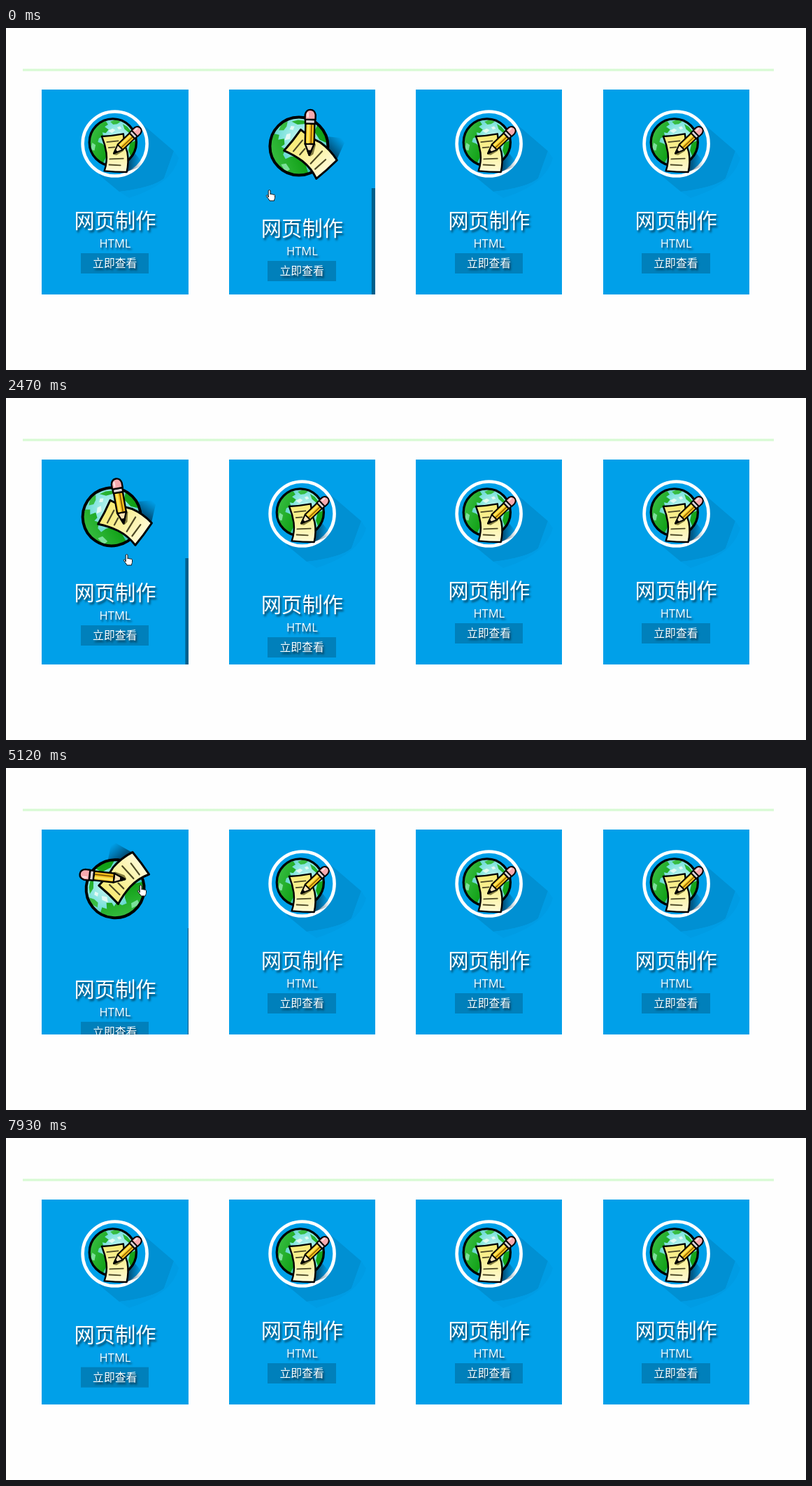
An HTML page for the animation above (8.03 s loop, 1144 by 489 pixels).

```html
<!DOCTYPE html>
<html lang="zh-CN">
<head>
<meta charset="utf-8">
<title>网页制作</title>
<style>
html, body { margin: 0; width: 100%; height: 100%; overflow: hidden; background: #fefefe; }
body { position: relative; font-family: "Open Sans", "Noto Sans CJK SC", "Noto Sans CJK", sans-serif; color: #fff; }
.rule { position: absolute; left: 24px; top: 58px; width: 1074px; height: 4px;
  background: linear-gradient(#ecfdea, #d6fad2 40%, #d6fad2 60%, #ecfdea); }
.card { position: absolute; top: 88px; width: 209.2px; height: 292.6px; overflow: hidden; background: #00a0e9; }
.card svg { position: absolute; left: 0; top: 0; width: 209px; height: 292px; }
.card div { position: absolute; white-space: nowrap; }
.card .label { left: 0; top: 0; width: 100%; height: 100%; text-align: center; text-shadow: 2px 3px 3px rgba(0,0,0,.6); }
.label .title { left: 0; right: 0; top: 167px; font-size: 29.3px; line-height: 40px; }
.label .sub { left: 0; right: 0; top: 207.5px; font-size: 16.5px; line-height: 24px; }
.label .more { left: 55.6px; top: 234px; width: 97.4px; height: 29px; font-size: 15.8px; line-height: 29px; background: rgba(0,0,0,.2); }
.card .panel { left: 0; top: 141px; width: 100%; height: 152px; background: #00608c; text-shadow: 2px 2px 3px rgba(0,0,0,.7); }
.panel .bar { left: 19.6px; top: 20px; width: 4.6px; height: 51px; background: #eff6fa; }
.panel .title { left: 34px; top: 21.5px; font-size: 23.5px; line-height: 32px; font-weight: bold; }
.panel .sub { left: 34px; top: 50.5px; font-size: 16.5px; line-height: 22px; }
.panel .info { left: 19.6px; top: 72px; font-size: 15.7px; line-height: 20.4px; }
.en { font-size: 1.06em; line-height: 1; }
#hand { position: absolute; left: 0; top: 0; width: 16px; height: 18px; overflow: visible; }
</style>
</head>
<body>
<svg width="0" height="0" style="position:absolute">
  <defs>
    <radialGradient id="sea" cx=".62" cy=".4" r=".65">
      <stop offset="0" stop-color="#c4f5f2"/><stop offset=".5" stop-color="#7fe3dd"/><stop offset="1" stop-color="#35bfae"/>
    </radialGradient>
    <linearGradient id="land" x2="1" y2="1">
      <stop offset="0" stop-color="#3fc24a"/><stop offset="1" stop-color="#089a0c"/>
    </linearGradient>
    <linearGradient id="sheet" x2="0" y2="1">
      <stop offset="0" stop-color="#f7ea72"/><stop offset=".6" stop-color="#fbf3a8"/><stop offset="1" stop-color="#fffbd8"/>
    </linearGradient>
    <linearGradient id="shade">
      <stop offset="0" stop-color="#001a2c" stop-opacity=".95"/><stop offset="1" stop-color="#003a60" stop-opacity="0"/>
    </linearGradient>
    <clipPath id="disc"><circle cx="100.5" cy="77.5" r="41"/></clipPath>

    <g id="art">
      <path d="M118 92L134 90L152 112L150 120L126 129Z" fill="url(#shade)"/>
      <circle cx="100.5" cy="77.5" r="41.5" fill="url(#sea)"/>
      <g clip-path="url(#disc)" fill="url(#land)">
        <path d="M60 68L66 54L76 44L88 40L92 46L86 50L93 55L88 61L82 60L84 67L76 70L74 77L82 80L90 88L92 98L86 108L80 120L62 108Z"/>
        <path d="M96 41L106 37L114 41L108 45L101 46ZM118 45L126 50L134 60L128 60L121 54ZM131 78L142 74L142 100L133 104L128 92Z"/>
        <path d="M64 78L70 82L68 92L61 90Z" fill="#7be09a"/>
        <path d="M92 57l8-4 5 3-6 5zM108 51l5-2 3 4-5 2z" fill="#e2faf4"/>
      </g>
      <circle cx="100.5" cy="77.5" r="41.5" fill="none" stroke="#000" stroke-width="4"/>
      <path d="M81 67Q100 66 119 62.500Q121 82 126 95Q129 112 125 130Q104 130 85.500 128Q91 112 89 96Q87 82 81 67Z"
        fill="url(#sheet)" stroke="#000" stroke-width="3" stroke-linejoin="round"/>
      <path d="M90 77L110 75M93 87L104 86M95 107L119 106M94 117L114 118" stroke="#4d4926" stroke-width="2.200" stroke-linecap="round"/>
      <path d="M101 99L122 83L119 93L107 100Z" fill="#55501f" opacity=".75"/>
      <g transform="translate(102 97) rotate(-43.700)" stroke="#000" stroke-width="2.400" stroke-linejoin="round">
        <path d="M0 0L16-6.500V6.500Z" fill="#fbe3b4"/>
        <path d="M0 0L6-2.400V2.400Z" fill="#000"/>
        <path d="M16-6.500H45V6.500H16Z" fill="#f5bd1c"/>
        <path d="M17-2.500H44" stroke="#ffe65a" stroke-width="3.500"/>
        <path d="M17 2H44" stroke="#6b4700" stroke-width="1.400"/>
        <path d="M45-7H51V7H45Z" fill="#d9d3d6"/>
        <path d="M51-7.500H58Q65-6 65 0T58 7.500H51Z" fill="#f7a9ae"/>
        <path d="M55-3.500H60" stroke="#ffe0e0" stroke-width="2.500" stroke-linecap="round"/>
      </g>
    </g>

    <g id="badge">
      <path d="M139 45L189 88L175 127Q160 140 111 146L82 122Z" fill="#0090d3"/>
      <path d="M189 88L196 98Q186 136 125 155L111 146Q160 140 175 127Z" fill="#009ce4"/>
      <circle cx="104.600" cy="77.500" r="46" fill="#00a0e9" stroke="#fff" stroke-width="4.600"/>
      <use href="#art" transform="translate(101.800 75.500) scale(.81) translate(-100.500 -77.500)"/>
    </g>
  </defs>
</svg>

<div class="rule"></div>
<div id="cards"></div>
<svg id="hand"><path d="M4.200 11V2a1.400 1.400 0 0 1 2.800 0v5a1.200 1.200 0 0 1 2.300.2a1.200 1.200 0 0 1 2.200.5a1.100 1.100 0 0 1 2 .8v3.200c0 1.200-1 2.200-1 4.300H6c-.6-2-3.600-4.600-4.600-6.600c-.6-1.400.9-2 1.700-1.100z"
  fill="#fff" stroke="#111" stroke-linejoin="round"/></svg>

<script>
const LOOP = 8030, DROP = 292, WIDE = 209.2, TURN = 466;

const cardHtml = i => `
  <div class="card" style="left:${51.4 + 267.4 * i}px">
    <svg><use class="badge" href="#badge"/><use class="art" href="#art" visibility="hidden"/></svg>
    <div class="label">
      <div class="title">网页制作</div><div class="sub">HTML</div><div class="more">立即查看</div>
    </div>
    <div class="panel" style="transform:translateX(${WIDE + 1}px)">
      <div class="bar"></div><div class="title">网页制作</div><div class="sub">HTML</div>
      <div class="info">课程：<span class="en">HTML+DIV+CSS</span><br><span class="en">+</span>项目实战，<span class="en">2</span>个月一<br>期。</div>
    </div>
  </div>`;
document.getElementById('cards').innerHTML = [0, 1, 2, 3].map(cardHtml).join('');

function bezier(x1, y1, x2, y2) {
  const at = (a, b, s) => 3 * a * s * (1 - s) ** 2 + 3 * b * s * s * (1 - s) + s ** 3;
  return x => {
    if (x <= 0) return 0;
    if (x >= 1) return 1;
    let lo = 0, hi = 1;
    for (let i = 0; i < 24; i++) {
      const mid = (lo + hi) / 2;
      if (at(x1, x2, mid) < x) lo = mid; else hi = mid;
    }
    return at(y1, y2, lo);
  };
}
const ease = bezier(.25, .1, .25, 1), easeInOut = bezier(.42, 0, .58, 1);

// Each move: [start, duration, from, to]
const enter = { drop: (t, from = 0) => [t, 1100, from, DROP], slide: t => [t, 1500, WIDE, 0], spin: t => [t, TURN, -180, 0] };
const leave = { drop: t => [t, 1300, DROP, 0], slide: t => [t, 1000, 0, WIDE], spin: t => [t, TURN, 0, -180] };

const tracks = [
  {
    drop: [enter.drop(2391), leave.drop(4110), enter.drop(5075, 40), leave.drop(6760)],
    slide: [enter.slide(2327), leave.slide(3930), enter.slide(5075), leave.slide(6760)],
    spin: [enter.spin(2283), leave.spin(3930), enter.spin(5031), leave.spin(6760)]
  },
  {
    drop: [enter.drop(-150), leave.drop(1410)],
    slide: [enter.slide(-170), leave.slide(1410)],
    spin: [enter.spin(-210), leave.spin(1410)]
  }
];

// Pointer stops: [time, x, y]
const stops = [
  [0, 371, 231], [1000, 371, 231], [1410, 342, 387], [1600, 300, 414], [1790, 261, 408],
  [2200, 190, 400], [2330, 178, 372], [2460, 167, 223], [3720, 167, 223], [3940, 172, 380],
  [4200, 180, 442], [4600, 182, 440], [4900, 180, 404], [5060, 186, 230], [5110, 187, 167],
  [6300, 187, 167], [6750, 182, 371], [7000, 180, 430], [7300, 178, 495], [LOOP, 178, 495]
];

function valueAt(moves, t, rest, curve) {
  const move = moves.filter(m => m[0] <= t).pop();
  if (!move) return rest;
  const [start, time, from, to] = move;
  return from + (to - from) * curve((t - start) / time);
}

function pointerAt(t) {
  const i = Math.max(1, stops.findIndex(s => s[0] > t));
  const [t0, x0, y0] = stops[i - 1], [t1, x1, y1] = stops[i];
  const k = (t - t0) / (t1 - t0);
  return [x0 + (x1 - x0) * k, y0 + (y1 - y0) * k];
}

const views = [...document.querySelectorAll('.card')].map(card => {
  const find = name => card.querySelector('.' + name);
  return { label: find('label'), panel: find('panel'), art: find('art'), badge: find('badge') };
});
const hand = document.getElementById('hand');
const show = (el, on) => el.setAttribute('visibility', on ? 'visible' : 'hidden');

function draw(t) {
  tracks.forEach((track, i) => {
    const view = views[i];
    const angle = valueAt(track.spin, t, -180, ease);
    const slide = valueAt(track.slide, t, WIDE, easeInOut);
    const active = angle > -180;
    view.label.style.transform = `translateY(${valueAt(track.drop, t, 0, easeInOut)}px)`;
    view.panel.style.transform = `translateX(${slide >= WIDE ? WIDE + 1 : slide}px)`;
    view.art.setAttribute('transform', `rotate(${angle} 104.5 80)`);
    show(view.art, active);
    show(view.badge, !active);
  });
  const [x, y] = pointerAt(t);
  hand.style.transform = `translate(${x}px, ${y}px)`;
}

const began = performance.now();
function tick() {
  draw((performance.now() - began) % LOOP);
  requestAnimationFrame(tick);
}
draw(0);
requestAnimationFrame(tick);
</script>
</body>
</html>
```
